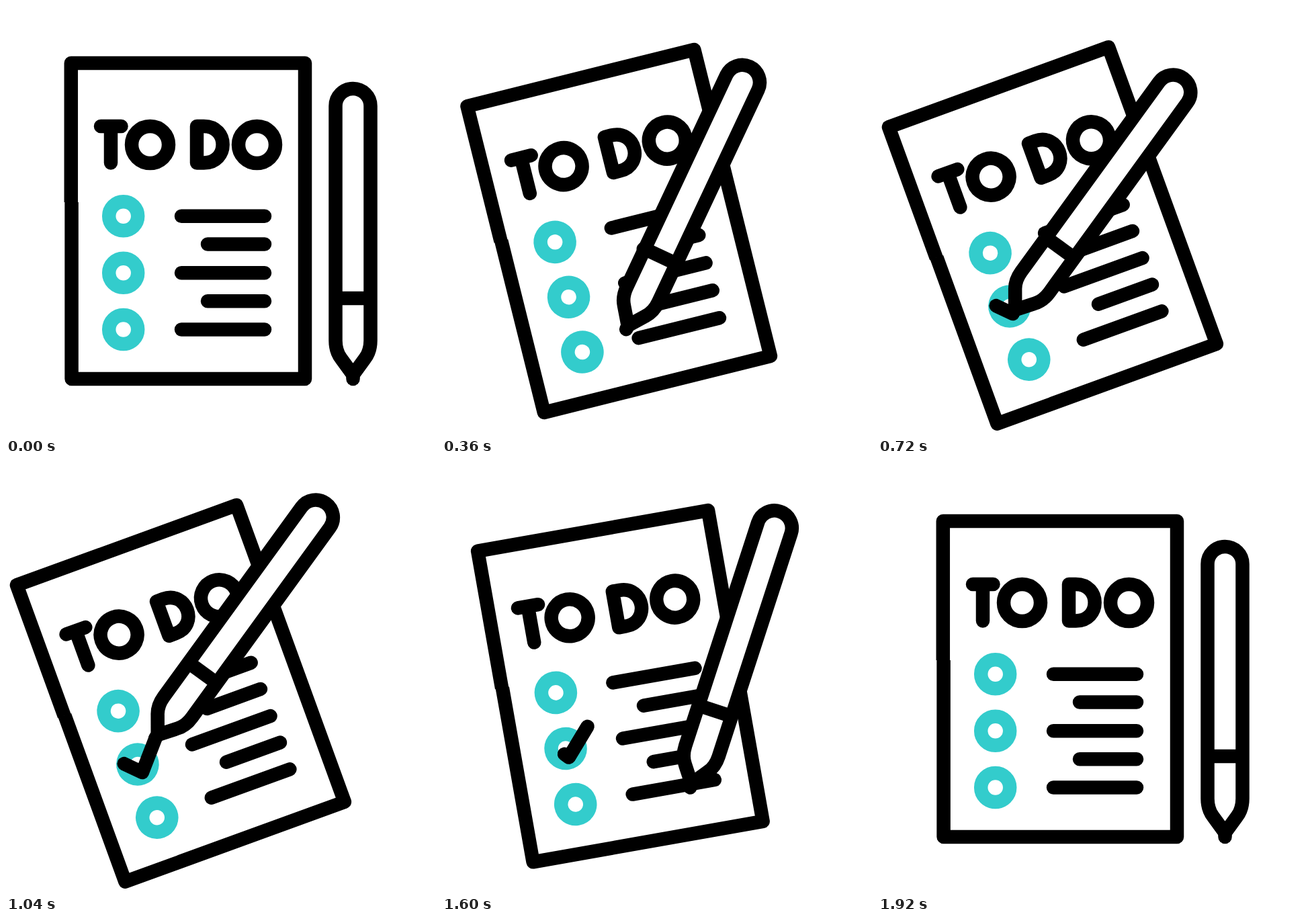
An HTML page that plays this animation: 640x640 px, repeating every 2 s.

```html
<!DOCTYPE html>
<html lang="en">
<head>
<meta charset="utf-8">
<title>To do</title>
<style>
  html, body { margin: 0; width: 100%; height: 100%; overflow: hidden; background: #fff; }
  svg { display: block; width: 100vw; height: 100vh; }
</style>
</head>
<body>
<svg viewBox="0 0 640 640" fill="none" stroke="#000" stroke-width="20.5" stroke-linejoin="round" stroke-linecap="round">
  <g id="paper">
    <path d="M97.6 292V555H445V85H96.8V292" stroke-linecap="butt"/>
    <g role="img" aria-label="TO DO">
      <path d="M141 179H171.5M156 179V233.5"/>
      <circle cx="214.5" cy="206.5" r="27.5"/>
      <path d="M284 179H294.5C332 179 332 233.5 294.5 233.5H284Z"/>
      <circle cx="373.5" cy="206.5" r="27.5"/>
    </g>
    <g stroke="#33cccc">
      <circle cx="174.7" cy="312.8" r="21.5"/>
      <circle cx="174.7" cy="397.2" r="21.5"/>
      <circle cx="174.7" cy="481.5" r="21.5"/>
    </g>
    <path d="M261 312.8H385M300 354.5H385M261 397.2H385M300 439.3H385M261 481.5H385"/>
    <path id="check" d="M156 389.5L177.1 410.9L212.4 370.5"/>
  </g>
  <!-- The pen's origin is its tip. -->
  <g id="pen">
    <path fill="#fff" d="M-26 -406A26 26 0 0 1 26 -406V-57C26 -46 23 -37 17.5 -30L0 -6L-17.5 -30C-23 -37 -26 -46 -26 -57Z"/>
    <path d="M0 -6V0"/>
    <path d="M-26 -120H26" stroke-linecap="butt"/>
  </g>
</svg>
<script>
const LOOP = 2000, STEP = 40, TILT = -20, LEAN = 36;
const CENTER = { x: 271, y: 320 }, SHIFT = { x: -11, y: 21.5 }, REST = { x: 516.5, y: 555 };
const paper = document.getElementById('paper');
const pen = document.getElementById('pen');
const check = document.getElementById('check');
const length = check.getTotalLength();

const mix = (a, b, k) => a + (b - a) * k;
const ease = (t, from, to) => {
  const x = Math.min(1, Math.max(0, (t - from) / (to - from)));
  return x * x * (3 - 2 * x);
};

// Stage position of a point on the check mark while the paper is fully tilted.
function markPoint(k) {
  const p = check.getPointAtLength(length * k);
  const a = TILT * Math.PI / 180, x = p.x - CENTER.x, y = p.y - CENTER.y;
  return {
    x: CENTER.x + SHIFT.x + x * Math.cos(a) - y * Math.sin(a),
    y: CENTER.y + SHIFT.y + x * Math.sin(a) + y * Math.cos(a) - 1
  };
}

function draw(t) {
  const arrive = ease(t, 80, 520), leave = ease(t, 1280, 1920);
  const write = ease(t, 520, 1040), erase = ease(t, 1480, 1840);
  const k = arrive * (1 - leave);

  paper.setAttribute('transform',
    `translate(${SHIFT.x * k} ${SHIFT.y * k}) rotate(${TILT * k} ${CENTER.x} ${CENTER.y})`);

  check.style.display = write > erase ? '' : 'none';
  check.setAttribute('stroke-dasharray', `${(write - erase) * length} ${length * 2}`);
  check.setAttribute('stroke-dashoffset', -erase * length);

  // The way in bows slightly; the way back is straight.
  const tip = markPoint(write), bow = 4 * arrive * (1 - arrive);
  const x = mix(REST.x, tip.x, k) - 4.7 * bow, y = mix(REST.y, tip.y, k) + 3.6 * bow;
  pen.setAttribute('transform', `translate(${x} ${y}) rotate(${LEAN * k})`);
}

const start = performance.now();
function tick() {
  const t = Math.max(0, performance.now() - start) % LOOP;
  draw(Math.floor(t / STEP) * STEP);
  requestAnimationFrame(tick);
}
tick();
</script>
</body>
</html>
```
